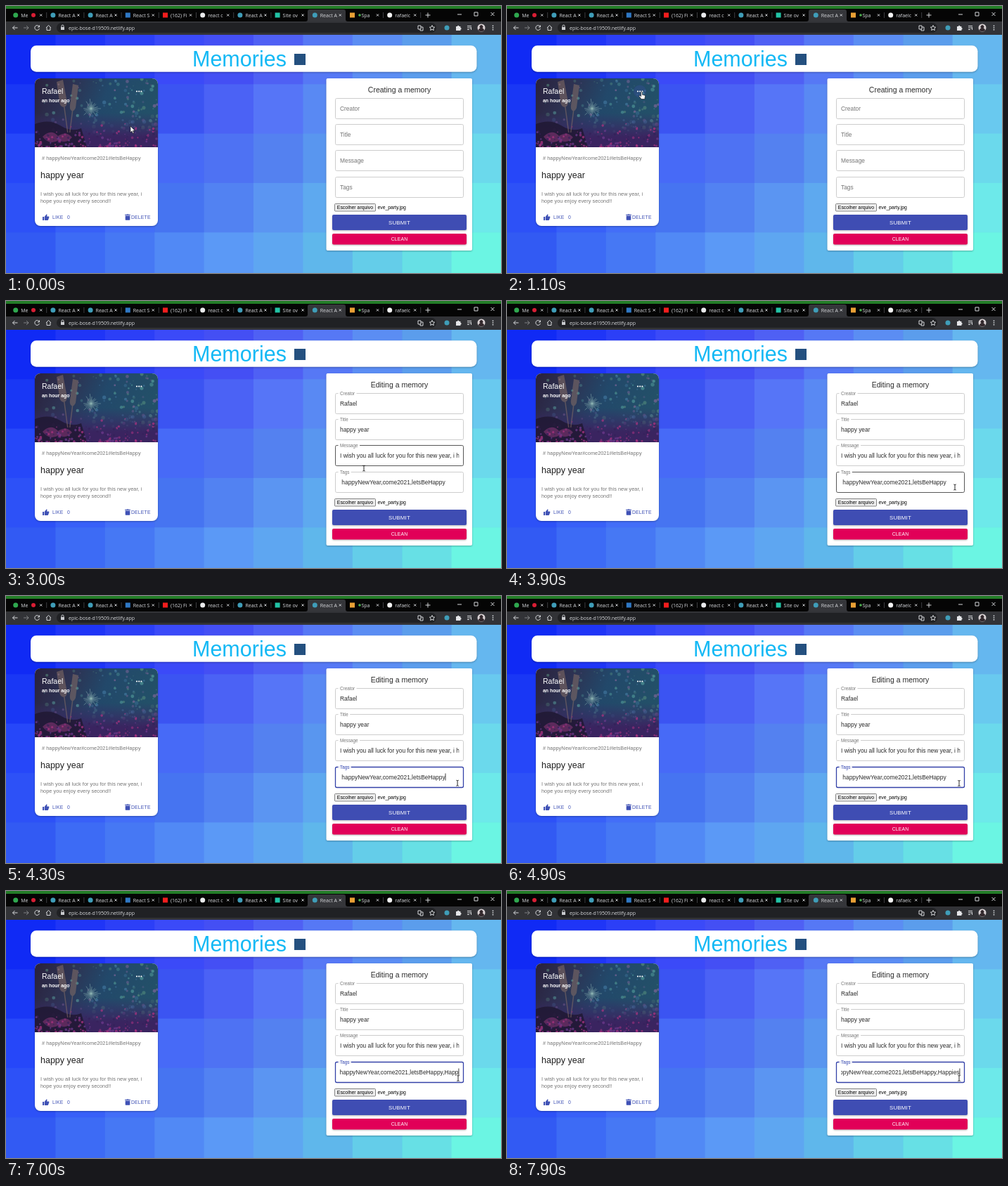
An HTML page that plays this animation: 704x380 px, repeating every 8 s.

```html
<!DOCTYPE html>
<html lang="en">
<head>
<meta charset="utf-8">
<title>Memories</title>
<style>
  html, body { margin: 0; width: 100%; height: 100%; overflow: hidden; background: #1a2ff2; }
  svg { display: block; width: 100vw; height: 100vh; }
  text { font-family: "Liberation Sans", Arial, sans-serif; white-space: pre; }
  .ui text { font-family: "Open Sans", "Noto Sans", sans-serif; font-size: 7px; fill: #d6d8dc; }
  .icon { fill: none; stroke: #d5d7da; stroke-width: 1; }
  .paper { fill: #fff; filter: drop-shadow(0 1px 1px rgba(0,0,0,.28)); }
  .body { font-size: 7.3px; letter-spacing: .05px; fill: #757575; }
  .btn { font-size: 6.8px; letter-spacing: .2px; fill: #3f51b5; }
  .mid { text-anchor: middle; }
</style>
</head>
<body>
<svg viewBox="0 0 704 380" preserveAspectRatio="none">
  <defs>
    <clipPath id="cardClip"><rect x="41" y="103" width="175" height="210" rx="8"/></clipPath>
    <clipPath id="photoClip"><rect x="41" y="103" width="175" height="98"/></clipPath>
    <clipPath id="inputClip"><rect x="475" y="125" width="169.5" height="150"/></clipPath>
    <linearGradient id="night" x2="1" y2=".25">
      <stop offset="0" stop-color="#29213d"/><stop offset=".3" stop-color="#2d3252"/>
      <stop offset=".6" stop-color="#22486a"/><stop offset="1" stop-color="#235068"/>
    </linearGradient>
    <linearGradient id="floor" x2="0" y2="1">
      <stop offset=".5" stop-color="#3a2868" stop-opacity="0"/><stop offset=".85" stop-color="#3a2460"/>
    </linearGradient>
  </defs>

  <g id="tiles"></g>

  <g class="ui">
    <rect width="704" height="41" fill="#050505"/>
    <rect width="704" height="4" fill="#237d27"/>
    <path d="M426 22q3 0 3-3V8q0-3 3-3h48q3 0 3 3v11q0 3 3 3z" fill="#35363a"/>
    <rect y="22" width="704" height="19" fill="#323337"/>
    <rect x="72" y="24" width="540" height="14" rx="7" fill="#202124"/>
    <g id="tabs"></g>
    <path class="icon" d="M600 9.500v7M596.500 13h7M642 12h6M666 9h5v5h-5zM689.500 9l5 5M694.500 9l-5 5"/>
    <path class="icon" d="M16.500 31h-7M12.500 28l-3 3 3 3"/>
    <path class="icon" stroke-opacity=".45" d="M25 31h7M29 28l3 3-3 3"/>
    <path class="icon" d="M47 29a3.400 3.400 0 1 0 .5 3M47.500 27.500v2.500h-2.500M57 31l3.500-3.500 3.500 3.500M58 30.500v4h5v-4"/>
    <rect x="78" y="30" width="5" height="4" fill="#c8cace"/>
    <path class="icon" d="M79 30v-1.500a1.500 1.500 0 0 1 3 0V30"/>
    <text x="89" y="33.600">epic-bose-d19509.netlify.app</text>
    <path class="icon" stroke-width=".9" d="M586 28h4v5h-4zM590 30h3v5h-4v-2M606 27.500l1.100 2.400 2.600.3-1.900 1.800.5 2.600-2.300-1.300-2.300 1.300.5-2.600-1.900-1.800 2.600-.3z"/>
    <circle cx="627" cy="31" r="3.500" fill="#3f9db8"/>
    <path d="M640 29h2a1.200 1.200 0 0 1 2.400 0h2v2a1.200 1.200 0 0 1 0 2.400v1.600h-6.400z" fill="#e4e5e8"/>
    <path class="icon" d="M656 28.500h6M656 31h6M656 33.500h3M661.500 30v4"/>
    <circle cx="676" cy="31" r="5.500" fill="#d9d2d4"/>
    <path d="M672 35q0-3 2.500-3.500a2.400 2.400 0 1 1 3 0q2.500.5 2.500 3.500-4 2.500-8 0z" fill="#33292d"/>
    <path d="M692.500 27.500v1.500m0 1.200v1.500m0 1.200v1.500" stroke="#dfe1e5" stroke-width="1.500"/>
  </g>

  <rect class="paper" x="35" y="56.300" width="634.500" height="37.400" rx="8"/>
  <text x="265" y="85.800" font-size="30.500" fill="#14b9f5">Memories</text>
  <rect x="410" y="68" width="16" height="16" fill="#24507f"/>

  <rect class="paper" x="41" y="103" width="175" height="210" rx="8"/>
  <g clip-path="url(#cardClip)">
    <g clip-path="url(#photoClip)">
      <rect x="41" y="103" width="175" height="98" fill="url(#night)"/>
      <g id="bokeh"></g>
      <rect x="41" y="103" width="175" height="98" fill="url(#floor)"/>
      <path d="M41 168q20-8 36 2t30 4l8 27H41z" fill="#1f1730" fill-opacity=".8"/>
      <g fill="#8d7468" fill-opacity=".5">
        <path d="M72 108l9-3 6 32q-1 7-5 7-5-1-6-7zM82 143l1.500 0 5 37-1.500 0z"/>
        <path d="M95 111l8 2-4 32q-3 6-6 4-3-3-2-8zM94 148l1.500 0-4 32-1.500 0z"/>
      </g>
      <g id="sparkler" stroke="#8fb5b4" stroke-width=".7" stroke-opacity=".7"></g>
      <path d="M52 186q12-12 22-1 12-8 20 2-9 10-19 4-13 8-23-5z" fill="#5c2a5c"/>
      <g id="glitter"></g>
    </g>
  </g>
  <circle id="dotHover" cx="189" cy="121.500" r="9" fill="#3f51b5" fill-opacity=".25"/>
  <text x="51" y="125" font-size="10.500" fill="#fff">Rafael</text>
  <text x="51" y="137" font-size="6.900" font-weight="bold" fill="#fff">an hour ago</text>
  <g fill="#fff"><circle cx="186" cy="121.500" r="1.100"/><circle cx="189.200" cy="121.500" r="1.100"/><circle cx="192.400" cy="121.500" r="1.100"/></g>
  <text class="body" x="51" y="219.300"># happyNewYear#come2021#letsBeHappy</text>
  <text x="49" y="245" font-size="12.500" fill="#212121">happy year</text>
  <text class="body" x="49" y="269.700">I wish you all luck for you for this new year, i</text>
  <text class="body" x="49" y="279.900">hope you enjoy every second!!</text>
  <g fill="#3f51b5">
    <path d="M52 300h2v5h-2zM54.700 300l3-3.700q1 .3.800 1.200l-.4 1.900h2.700q.8.200.6 1.100l-1.300 3.700q-.3.800-1 .800h-3.600q-.8-.1-.8-.8z"/>
    <path d="M169.700 298.500h6.600v5.500q0 .8-.8.800h-5q-.8 0-.8-.8zM169 296.800h2.200l.6-.6h2.400l.6.600h2.200v1h-8z"/>
  </g>
  <text class="btn" x="66" y="303.300">LIKE</text>
  <text class="btn" x="87" y="303.300">0</text>
  <text class="btn" x="178" y="303.300">DELETE</text>

  <rect class="paper" x="455.500" y="103" width="207.500" height="245" rx="2"/>
  <text id="heading" class="mid" x="559.500" y="122.800" font-size="10.500" fill="#2b2b2b"></text>
  <g id="fields"></g>
  <rect x="467.500" y="281.500" width="58" height="10.500" rx="1" fill="#efefef" stroke="#666" stroke-width=".8"/>
  <text class="mid" x="496.500" y="289.200" font-size="6.900">Escolher arquivo</text>
  <text x="528.500" y="289.200" font-size="6.800">eve_party.jpg</text>
  <rect class="paper" style="fill:#3f4db3" x="464" y="297" width="191" height="22" rx="2"/>
  <text class="mid" x="559.500" y="311" font-size="7.850" letter-spacing=".2" fill="#fff">SUBMIT</text>
  <rect class="paper" style="fill:#e10058" x="464" y="324" width="191" height="15.500" rx="2"/>
  <text class="mid" x="559.500" y="334.300" font-size="6.800" letter-spacing=".2" fill="#fff">CLEAN</text>

  <path id="caret" stroke="#111" stroke-width=".8"/>
  <g id="arrow"><path d="M0 0v9l2.100-1.900 1.400 3.200 1.500-.7-1.400-3.100h2.800z" fill="#fff" stroke="#111" stroke-width=".6"/></g>
  <g id="hand"><path d="M-.9.500q.9-1.200 1.800 0v3.800l3 .6q1.200.3 1.100 1.500l-.7 4.100h-4.800l-3.200-4.300q.4-1.300 1.700-.4l1.100 1z" fill="#fff" stroke="#111" stroke-width=".6"/></g>
  <g id="beam"><path d="M-1.700-4q1.700 0 1.700 1 0-1 1.700-1M0-3v6M-1.700 4q1.700 0 1.700-1 0 1 1.700 1" fill="none" stroke="#111" stroke-width=".9"/></g>
</svg>
<script>
const LOOP = 8000, EDIT = 1200, FOCUS = 4300;
const $ = id => document.getElementById(id);

function add(parent, tag, attrs, text) {
  const el = document.createElementNS('http://www.w3.org/2000/svg', tag);
  set(el, attrs);
  if (text) el.textContent = text;
  return parent.appendChild(el);
}
function set(el, attrs) {
  for (const k in attrs) el.setAttribute(k, attrs[k]);
}
const show = (el, on) => { el.style.display = on ? '' : 'none'; };
const lerp = (a, b, p) => a + (b - a) * p;
const clamp = p => Math.max(0, Math.min(1, p));
const ease = p => p * p * (3 - 2 * p);
const mix = (a, b, p) => a.map((v, i) => lerp(v, b[i], p));

let seed = 7;
const rand = () => (seed = seed * 16807 % 2147483647) / 2147483647;
for (let i = 0; i < 9; i++) rand();

// Backdrop: a mosaic of squares running from blue to aqua
const TOP = [[16, 42, 245], [77, 86, 246], [100, 182, 238]];
const BOTTOM = [[54, 94, 247], [92, 156, 242], [108, 246, 228]];
const ramp = (c, p) => p < .5 ? mix(c[0], c[1], p * 2) : mix(c[1], c[2], p * 2 - 1);
for (let r = 0; r < 5; r++) for (let c = 0; c < 10; c++) {
  const shade = (rand() - .5) * 8;
  const rgb = mix(ramp(TOP, c / 9), ramp(BOTTOM, c / 9), r / 4).map(v => Math.round(v + shade));
  add($('tiles'), 'rect', { x: c * 70.4, y: 41 + r * 70.3, width: 71, height: 71, fill: `rgb(${rgb})` });
}

// Browser tabs: icon colour, round icon, title
const CYAN = '#3f9db8';
[['#2fa84f', 1, 'Me'], [CYAN, 1, 'React A'], [CYAN, 1, 'React A'], ['#2f78c4', 0, 'React S'],
 ['#f21d1d', 0, '(162) Fi'], ['#e9eaec', 1, 'react c'], [CYAN, 1, 'React A'], ['#22c3a6', 0, 'Site ov'],
 [CYAN, 1, 'React A'], ['#e9a035', 0, '   Spa'], ['#f4f4f4', 1, 'rafaelc']
].forEach(([fill, round, title], i) => {
  const x = 13.7 + i * 53.2, tabs = $('tabs');
  add(tabs, 'rect', { x: x - 3.5, y: 9.5, width: 7, height: 7, rx: round ? 3.5 : 0, fill });
  add(tabs, 'text', { x: x + 7.5, y: 15.5 }, title);
  add(tabs, 'path', { class: 'icon', d: `M${x + 34.5} 11.500l3 3m0-3l-3 3` });
  if (i !== 7 && i !== 8) add(tabs, 'path', { d: `M${x + 44} 9v8`, stroke: '#55575b', 'stroke-width': .7 });
});
add($('tabs'), 'circle', { cx: 39, cy: 13, r: 3, fill: '#d81e34' });
add($('tabs'), 'circle', { cx: 503, cy: 13, r: 1.8, fill: '#4caf50' });

// Picture: soft lights, a sparkler and glitter on the table
const LIGHTS = ['#5fb0a6', '#4a82ac', '#8a6aa0', '#5f9a82'];
for (let i = 0; i < 150; i++) add($('bokeh'), 'circle', {
  cx: 41 + 175 * Math.sqrt(rand()), cy: 103 + 85 * rand(), r: .8 + 2 * rand(),
  fill: LIGHTS[i % 4], 'fill-opacity': .2 + .4 * rand()
});
for (let i = 0; i < 26; i++) {
  const a = i * Math.PI / 13, r = 5 + 9 * rand();
  add($('sparkler'), 'path', { d: `M121 146l${r * Math.cos(a)} ${r * Math.sin(a)}` });
}
const GLITTER = ['#a8337f', '#6d3a8c', '#34205a', '#8a2f78'];
for (let i = 0; i < 170; i++) add($('glitter'), 'circle', {
  cx: 41 + 175 * rand(), cy: 201 - 24 * rand() * rand() * 1.4, r: .7 + 1.3 * rand(),
  fill: GLITTER[i % 4], 'fill-opacity': .75
});

// Form fields
const TAGS = ' happyNewYear,come2021,letsBeHappy';
const fields = [['Creator', 'Rafael'], ['Title', 'happy year'],
  ['Message', 'I wish you all luck for you for this new year, i hope you enjoy every second!!'], ['Tags', TAGS]
].map(([name, value], i) => {
  const y = 131.5 + Math.round(i * 37.2), g = $('fields');
  const box = add(g, 'rect', { x: 468.5, y, width: 182, height: 29, rx: 2, fill: 'none' });
  const notch = add(g, 'rect', { x: 472.5, y: y - 1, height: 2, fill: '#fff' });
  const label = add(g, 'text', { x: 475, 'font-size': 6.3 }, name);
  notch.setAttribute('width', label.getComputedTextLength() + 5);
  const clip = add(g, 'g', { 'clip-path': 'url(#inputClip)' });
  const input = add(clip, 'text', { x: 475, y: y + 17.3, 'font-size': 8.4, fill: '#2b2b2b' }, value);
  return { y, box, notch, label, input };
});

// Typed characters: time, text
const KEYS = [[5400, ','], [6300, 'H'], [6600, 'a'], [6850, 'p'], [7000, 'p'], [7250, 'i'], [7500, 'e'], [7700, 's']];

// Pointer: time, x, y
const PATH = [[0, 177, 171], [200, 177, 171], [1000, 191.5, 122], [2100, 191.5, 122], [2900, 509, 238],
  [3100, 509, 238], [3800, 637, 265], [4000, 637, 265], [4400, 643, 266.5], [LOOP, 643, 266.5]];
function pointer(t) {
  const i = PATH.findIndex(k => k[0] > t), a = PATH[i - 1], b = PATH[i];
  return mix(a, b, ease((t - a[0]) / (b[0] - a[0]))).slice(1);
}

function draw(t) {
  const [x, y] = pointer(t);
  const onDots = Math.hypot(x - 189, y - 121.5) < 9;
  const hover = fields.findIndex(f => x > 468 && x < 651 && y - 4 >= f.y && y - 4 <= f.y + 29);
  const edit = t >= EDIT, focused = t >= FOCUS;
  $('heading').textContent = edit ? 'Editing a memory' : 'Creating a memory';
  show($('dotHover'), onDots);

  const p = ease(clamp((t - EDIT) / 200));
  fields.forEach((f, i) => {
    const active = focused && i === 3;
    set(f.box, {
      stroke: active ? '#3442a8' : i === hover ? '#444' : '#c8c8c8',
      'stroke-width': active ? 1.3 : .9
    });
    set(f.label, { y: f.y + lerp(17.3, 2.2, p), 'font-size': lerp(8.4, 6.3, p), fill: active ? '#3f51b5' : '#757575' });
    show(f.notch, p > 0);
    show(f.input, edit);
  });

  const tags = fields[3], typed = KEYS.filter(k => k[0] <= t);
  tags.input.textContent = TAGS + typed.map(k => k[1]).join('');
  if (edit) {
    const width = tags.input.getComputedTextLength();
    const left = Math.min(475, 643.5 - width), end = left + width + .4;
    tags.input.setAttribute('x', left);
    $('caret').setAttribute('d', `M${end} 252.500v10`);
  }
  const last = typed.length ? typed[typed.length - 1][0] : FOCUS;
  show($('caret'), focused && (t - last) % 1000 < 500);

  const shape = onDots ? 'hand' : hover >= 0 ? 'beam' : 'arrow';
  for (const id of ['arrow', 'hand', 'beam']) {
    show($(id), id === shape);
    $(id).setAttribute('transform', `translate(${x} ${y})`);
  }
}

function tick() {
  draw(performance.now() % LOOP);
  requestAnimationFrame(tick);
}
tick();
</script>
</body>
</html>
```
